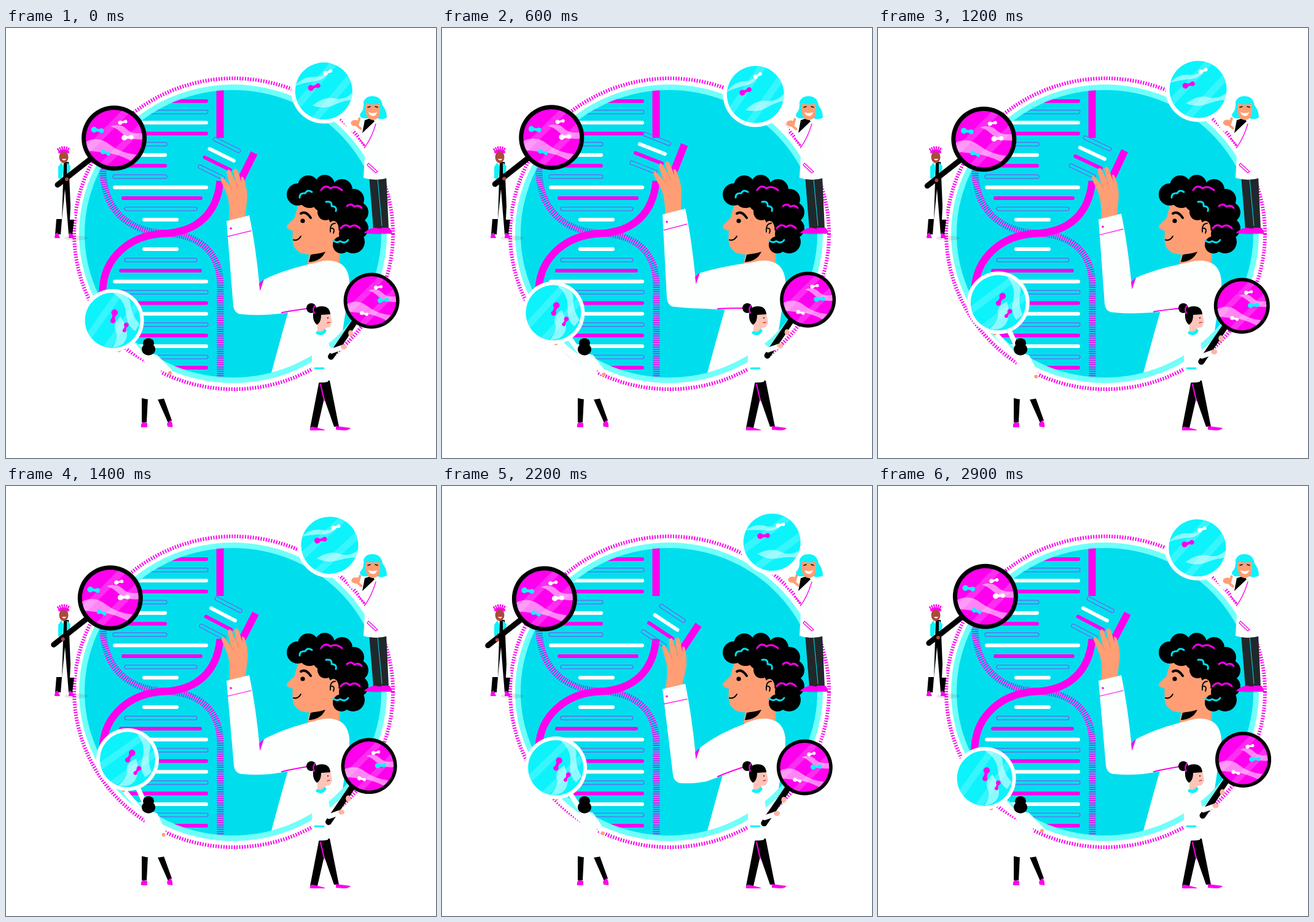
Write an HTML page that moves like this. It is 700 px wide and 700 px high and loops after 3000 ms.

```html
<!DOCTYPE html>
<html lang="en">
<head>
<meta charset="utf-8">
<title>DNA research</title>
<style>
  html, body { margin: 0; width: 100%; height: 100%; overflow: hidden; background: #fff; }
  svg { display: block; width: 100vw; height: 100vh; }
  .line { fill: none; stroke-linecap: round; stroke-linejoin: round; }
</style>
</head>
<body>
<svg id="stage" viewBox="0 0 700 700"></svg>
<script>
const PINK = '#ff00ee', CYAN = '#00deed', AQUA = '#0cf3fc', COAT = '#fdffff',
      SKIN = '#ff9e74', BLACK = '#000', VIOLET = '#7a5aee';

const shape = (d, fill) => `<path d="${d}" fill="${fill}"/>`;
const line = (d, color, width, extra = '') =>
  `<path class="line" d="${d}" stroke="${color}" stroke-width="${width}" ${extra}/>`;
const ellipse = (x, y, rx, ry, fill) => `<ellipse cx="${x}" cy="${y}" rx="${rx}" ry="${ry}" fill="${fill}"/>`;
const disc = (x, y, r, fill) => ellipse(x, y, r, r, fill);
const group = (content, transform, id = '') => `<g id="${id}" transform="${transform}">${content}</g>`;

function rung(x1, x2, y, kind) {
  if (kind === 1) return `<rect x="${x1}" y="${y - 3}" width="${x2 - x1}" height="6" rx="3" fill="none" stroke="${VIOLET}" stroke-width="1.2"/>`;
  return line(`M${x1 + 3} ${y}H${x2 - 3}`, kind ? '#fff' : PINK, 6);
}

function helix() {
  let out = '';
  const spans = [[174, 329], [184, 319], [193, 311], [222, 281]];
  for (let i = 0; i < 12; i++) {
    const [a, b] = i < 8 ? [174, i < 4 ? 329 : 262] : [spans[0], [188, 320], spans[2], spans[3]][i - 8];
    out += rung(a, b, 119 + i * 17.55, i % 3);
    const [c, d] = spans[Math.max(0, 3 - i)];
    out += rung(c, d, 360 + i * 17.55, (5 - i % 3) % 3);
  }
  const ticks = 'stroke-dasharray="1.7 1.9" style="stroke-linecap:butt"';
  const flat = 'style="stroke-linecap:butt"';
  return out +
    line('M158 200V235C160 292 195 331 258 334C312 336 349 362 349 420V575', PINK, 11, ticks) +
    line('M348.5 95V179', PINK, 12, flat) +
    line('M348.5 249C344 300 313 332 258 334.5C200 337 160 375 157.5 425V470', PINK, 12, flat);
}

function blob([x, y, size, angle, color]) {
  return group(disc(-size * .3, 0, size * .25, color) + disc(size * .34, 0, size * .2, color) +
    line(`M${-size * .3} 0H${size * .34}`, color, size * .24), `translate(${x} ${y}) rotate(${angle})`);
}

const flatWaves = 'M-46 6Q-26 -4 -8 10T36 27L28 37Q6 26 -12 24T-46 20ZM-6 -19Q10 -25 20 -15T47 -9V2Q26 4 14 -7T-6 -19Z';
const lowWaves = 'M-20 22Q0 8 16 13T46 6L43 18Q30 18 14 24T-20 22ZM-45 -12Q-32 -26 -14 -24T14 -36Q6 -18 -12 -17T-45 -12Z';
const tallWaves = 'M8 -45Q26 -30 24 -8T34 24L43 14Q32 -4 34 -22T8 -45ZM-8 45Q6 30 2 18T14 -4Q24 18 18 32T-8 45Z';

function lens(x, y, r, rim, rimColor, fill, waves, blobs, handle) {
  const glass = shape('M-50 18L18 -50H34L-50 34ZM-28 46L46 -28V-12L-12 46Z', '#ffffff2c') + shape(waves, '#ffffff85');
  return group(handle + disc(0, 0, r + rim, rimColor) + disc(0, 0, r, fill) +
    `<g clip-path="url(#glass)" transform="scale(${r / 46})">${glass}</g>` + blobs.map(blob).join(''),
    `translate(${x} ${y})`);
}

function scientistHead() {
  const curls = [[475, 271, 18], [492, 257, 17], [519, 255, 16], [547, 263, 17], [566, 279, 17], [573, 300, 17],
    [573, 326, 17], [565, 348, 19], [546, 353, 14], [520, 278, 23], [554, 302, 30], [520, 300, 13], [494, 275, 18],
    [560, 335, 18]];
  return shape('M494 365L491 386Q520 400 543 384V340Z', SKIN) +
    shape('M493 381Q513 380 520 364L496 369Z', BLACK) +
    shape('M478 282Q472 298 470 309L457 322Q457 328 467 330Q465 347 469 356Q477 371 501 368Q530 366 543 345V285Z', SKIN) +
    curls.map(([x, y, r]) => disc(x, y, r, BLACK)).join('') +
    ellipse(533, 327, 8.5, 13, SKIN) +
    line('M528 332Q527 318 536 318M530 326Q536 326 533 334', BLACK, 1.8) +
    line('M480 302Q488 297 496 309', BLACK, 4) + disc(483, 314, 3.6, BLACK) +
    line('M468 345Q475 347 480 339', BLACK, 2) +
    line('M478 276Q478 268 487 269Q491 262 498 267M521 283Q531 281 530 290Q539 290 537 298M533 346Q538 351 544 347Q552 352 557 345', CYAN, 3) +
    line('M513 264Q519 254 528 261Q537 256 547 264M555 290Q562 284 567 291Q574 287 579 293M545 326Q552 317 560 324Q568 318 576 326', PINK, 3);
}

const fragment = group(
  rung(-24, 25, -18, 1) + rung(-25, 25, 0, 2) + rung(-26, 26, 16, 0) + rung(-26, 21, 33, 1) +
  line('M46 -26V44', PINK, 12, 'style="stroke-linecap:butt"'), 'translate(353.5 209) rotate(27.5)');

const hand = shape('M363 325Q366 292 361 275Q354 258 351 250Q351 245 355 246L366 260Q361 241 361 237Q363 231 367 235L376 255' +
  'Q371 238 372 234Q376 229 379 235L385 255L384 246Q388 243 390 253Q395 270 393 284L388 325Z', SKIN) +
  line('M366 260L369 266M376 255L378 262', '#e9825e', 1);

const manLeft = ellipse(114, 342, 19, 4, '#00000018') +
  shape('M85 222L80 310H92L96 250L106 310H112L105 222Z', COAT) +
  shape('M94 218H102L105 290L104 312H111L108 336H102L96 262L91 312L89 336H80L82 311H91Z', BLACK) +
  shape('M90 219L85 226V244L91 248L94 226ZM99 219L105 225L103 243L99 236Z', AQUA) +
  shape('M79 342Q79 334 84 333L88 342ZM102 342L103 333Q111 336 111 342Z', PINK) +
  ellipse(94, 210, 7.5, 10, '#a94b3c') + shape('M91 213Q95 218 98 213Z', '#fff') +
  line('M85 200Q94 193 103 200', PINK, 8, 'stroke-dasharray="2 1.2" style="stroke-linecap:butt"') +
  line('M87 202Q94 197 101 202', PINK, 4);

const womanRight = ellipse(606, 333, 23, 3, '#00557066') +
  shape('M591 240H619L623 327H598Z', '#20282b') +
  line('M605 246L612 322', CYAN, 1) +
  shape('M583 334Q588 327 600 325L612 327V334ZM610 334V325H624Q628 328 628 335Z', PINK) +
  shape('M588 150Q608 145 616 158L622 244Q602 250 582 244L585 190L574 177L580 166L588 174Z', COAT) +
  shape('M584 150L596 146L600 152L580 171Z', BLACK) +
  line('M602 156Q596 177 585 193L575 180M590 220L605 234L602 236L588 223Z', PINK, 1.3) +
  shape('M582 120Q586 110 598 111Q611 112 613 126Q620 135 620 146Q612 150 605 147H581Q574 144 577 139Q583 134 582 120Z', AQUA) +
  shape('M586 122Q598 127 609 122V136Q608 149 597 150Q586 148 586 136Z', SKIN) +
  shape('M590 137Q597 140 604 137Q602 144 597 143Q592 143 590 137Z', '#fff') +
  line('M589 129L593 128M601 128L605 129', BLACK, 1.4);

const womanBack = shape('M221 602H231L229 642H221ZM245 600H256L270 639L264 643Z', BLACK) +
  shape('M220 650Q219 642 224 642L230 643V650ZM262 644L268 638Q272 644 271 650L263 649Z', PINK) +
  shape('M226 533Q242 525 250 540L258 603Q238 608 219 602L225 560Z', COAT) +
  ellipse(232, 513, 9, 8, BLACK) + ellipse(232, 523, 11, 10, BLACK);

const womanFront = shape('M510 574H527L542 649H534L518 603L507 651H495Z', BLACK) +
  line('M512 580L518 606', PINK, 2) +
  shape('M495 655Q494 648 500 649L519 654V655ZM537 654V648L561 651Q559 655 550 655Z', PINK) +
  shape('M505 494Q514 489 523 499L528 530L524 576Q508 579 498 575V520Q498 500 505 494Z', COAT) +
  line('M503 554H517', AQUA, 3) +
  shape('M507 480V493Q514 499 520 492V484Z', '#ffc4b8') +
  shape('M506 461H527L531 479L527 487Q518 490 506 483Z', '#ffc4b8') +
  line('M507 496Q514 500 519 493', AQUA, 5) +
  disc(497, 456, 8, BLACK) + shape('M500 466Q501 453 514 453Q527 453 528 466L513 467Q513 480 506 483Q499 477 500 466Z', BLACK) +
  line('M503 452Q498 458 502 464', PINK, 2) + line('M523 480L527 479', '#e03050', 1.3) + disc(524, 472, 1, BLACK);

const lensLeft = lens(0, 0, 46, 7, BLACK, PINK, flatWaves,
  [[-27, -13, 19, 8, AQUA], [-14, 24, 15, 20, AQUA], [14, -26, 14, -12, '#fff'], [22, -1, 18, -4, '#fff']],
  line('M-36 32L-92 76', BLACK, 9) + disc(-77, 67, 3, '#a94b3c'));
const lensRight = lens(523.4, 98.5, 46.5, 6.5, COAT, AQUA, lowWaves,
  [[-15, -8, 19, -14, PINK], [9, -30, 14, -20, '#fff']], line('M25 40L40 65', COAT, 8));
const lensBack = lens(184.5, 459.5, 45, 6, COAT, AQUA, tallWaves,
  [[3, -6, 21, 112, PINK], [18.5, 15, 15, 118, PINK]],
  line('M24 42L48 78', COAT, 8) + line('M6 53L50 91', COAT, 8) + disc(2, 50, 3, SKIN));
const lensFront = lens(0, 0, 40, 5.5, BLACK, PINK, flatWaves,
  [[11, -22, 13, -12, '#fff'], [19, -1, 17, -5, AQUA], [-12, 21, 13, 15, '#fff']],
  line('M-28 35L-66 91', BLACK, 10) + line('M-82 68L-65 82L-48 76', COAT, 8) +
  ellipse(-45, 75, 5, 4, '#ffb4a4') + ellipse(-34, 53, 4, 5, '#ffb4a4'));

const stage = document.getElementById('stage');
stage.innerHTML =
  `<defs><clipPath id="inside"><ellipse cx="369.5" cy="335" rx="241.5" ry="234"/></clipPath>` +
  `<clipPath id="glass"><circle r="46"/></clipPath></defs>` +
  `<ellipse cx="370.5" cy="335" rx="259.5" ry="253" fill="none" stroke="${PINK}" stroke-width="6" stroke-dasharray="2 2.3"/>` +
  ellipse(369.5, 335, 250.5, 243, '#70fffa') + ellipse(369.5, 335, 241.5, 234, CYAN) +
  `<g clip-path="url(#inside)">${helix()}` +
  group(fragment + hand, '', 'reach') + scientistHead() +
  shape('M494 386Q528 371 548 386Q565 402 556 440L535 580H427Q447 505 460 460Q470 415 494 386Z', COAT) +
  `<g id="sleeve"></g></g>` +
  manLeft + group(lensLeft, '', 'lensLeft') +
  group(lensRight, '', 'lensRight') + womanRight +
  group(ellipse(568, 155, 7, 5, SKIN) + line('M570 158L577 164M573 154L575 148', SKIN, 4), '', 'grip') +
  group(lensBack, '', 'lensBack') +
  group(line('M243 536L261 562', COAT, 9) + disc(262, 565, 3, SKIN), '', 'elbow') + womanBack +
  womanFront + group(lensFront, '', 'lensFront');

const part = id => document.getElementById(id);
const move = (id, transform) => part(id).setAttribute('transform', transform);

function sleeve(u) {
  const y = (base, k) => base + k * u;
  const elbow = 371 + 5 * u, low = 386 + 6 * u;
  return shape(`M359 ${y(317, 13.5)}L396 ${y(308, 14)}Q407 ${y(360, 14)} 413.5 ${y(431, 14)}L419 ${y(413, 14)}` +
      `C440 ${y(401, 9)} 475 ${y(388, 3)} 515 380L540 400L500 457Q460 ${y(465, 5)} 430 ${y(469, 12)}` +
      `Q405 ${y(471, 14)} ${low} ${y(469, 15)}Q${elbow + 2} ${y(469, 15)} ${elbow} ${y(455, 15)}Z`, COAT) +
    shape(`M413.5 ${y(431, 14)}L412 ${y(419, 14)}L420 ${y(412, 14)}Z`, PINK) +
    line(`M361 ${y(342, 13)}L399 ${y(333, 14)}`, PINK, 1.2) + disc(366, y(329, 13.5), 1.8, PINK) +
    line(`M449 ${y(465, 8)}Q470 ${y(460, 4)} 496 456`, PINK, 2);
}

function draw(t) {
  const sway = peak => Math.cos((t - peak) / 3000 * 2 * Math.PI);
  const left = sway(450), right = sway(530), back = sway(1475), front = sway(375), reach = sway(650);
  move('lensLeft', `translate(${172.3 + 6.3 * left} ${181 - 3 * left})`);
  move('lensRight', `rotate(${-10 * right} 573 179)`);
  move('grip', `translate(${1 - 1.5 * right} ${-1 + 1.5 * right})`);
  move('lensBack', `rotate(${9.9 * back} 274 531)`);
  move('elbow', `rotate(${10 * back} 243 534)`);
  move('lensFront', `translate(${592.8 + 3.2 * front} ${450.7 - 9.5 * front})`);
  move('reach', `translate(0 ${-15 * reach}) rotate(${-6 * reach} 376 317)`);
  part('sleeve').innerHTML = sleeve(-reach);
}

// The animation advances in steps of 100 ms.
const start = performance.now();
function tick() {
  draw(Math.floor((performance.now() - start) / 100) * 100 % 3000);
  requestAnimationFrame(tick);
}
tick();
</script>
</body>
</html>
```
